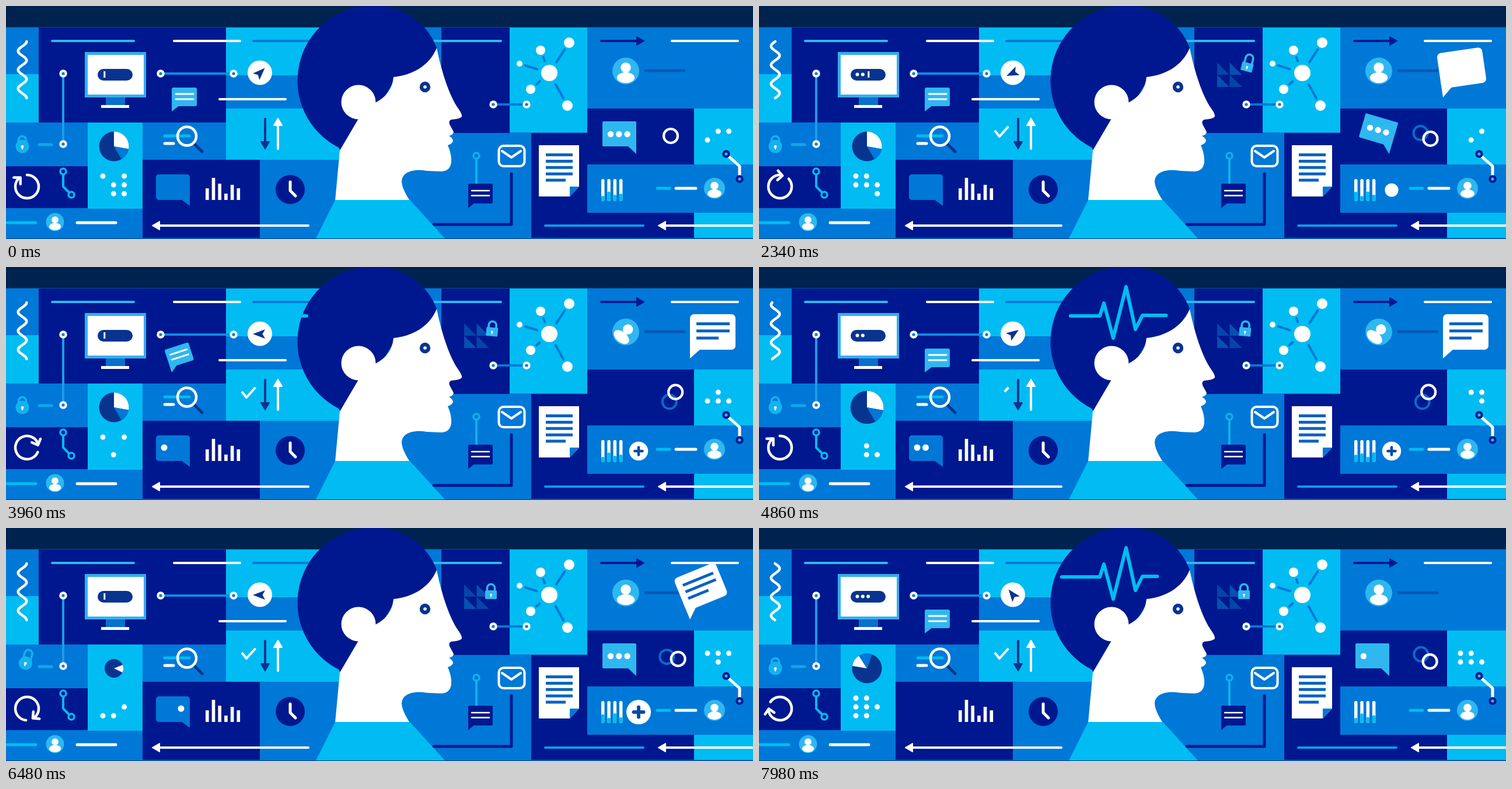
Write an HTML page with a canvas that moves like this. It is 1280x400 px and loops after 8 s.

```html
<!DOCTYPE html>
<html lang="en">
<head>
<meta charset="utf-8">
<title>Connected mind</title>
<style>
html, body { margin: 0; width: 100%; height: 100%; overflow: hidden; background: #00224f; }
canvas { display: block; width: 1280px; height: 400px; }
</style>
</head>
<body>
<canvas id="stage" width="1280" height="400"></canvas>
<script>
const c = document.getElementById('stage').getContext('2d');
const NAVY = '#00188f', BLUE = '#0078d7', CYAN = '#00bcf2', SKY = '#2fb7f0', INK = '#08348f', WHITE = '#fff';
const LOOP = 8, CYCLE = 3.37, TAU = Math.PI * 2, RAD = Math.PI / 180;
let t = 0;

// eased 0 to 1 between two times, and a rise followed by a fall
function ramp(from, to) {
  const f = Math.min(1, Math.max(0, (t - from) / (to - from)));
  return f * f * (3 - 2 * f);
}
const bump = (a, b, d, e) => ramp(a, b) - ramp(d, e);
const random = seed => Math.abs(Math.sin(seed * 127.1 + 3.7) * 43758.5) % 1;

function rect(color, x, y, x2, y2, r = 0) {
  c.fillStyle = color;
  c.beginPath();
  c.roundRect(x, y, x2 - x, y2 - y, r);
  c.fill();
}
function disc(x, y, r, color) {
  if (r <= 0) return;
  c.fillStyle = color;
  c.beginPath();
  c.arc(x, y, r, 0, TAU);
  c.fill();
}
function arc(x, y, r, w, color, from = 0, to = 360) {
  c.strokeStyle = color;
  c.lineWidth = w;
  c.beginPath();
  c.arc(x, y, r, from * RAD, to * RAD);
  c.stroke();
}
function slice(x, y, r, color, from, to) {
  c.fillStyle = color;
  c.beginPath();
  c.moveTo(x, y);
  c.arc(x, y, r, (from - 90) * RAD, (to - 90) * RAD);
  c.fill();
}
function trace(p) {
  c.beginPath();
  for (let i = 0; i < p.length; i += 2) c.lineTo(p[i], p[i + 1]);
}
function poly(color, ...p) {
  c.fillStyle = color;
  trace(p);
  c.fill();
}
function line(color, w, ...p) {
  c.strokeStyle = color;
  c.lineWidth = w;
  trace(p);
  c.stroke();
}
function rule(color, x, x2, y, w = 4) {
  line(color, w, x, y, x2, y);
}
function shape(color, d) {
  c.fillStyle = color;
  c.fill(new Path2D(d));
}
function place(x, y, scale, deg, draw) {
  if (scale <= 0.01) return;
  c.save();
  c.translate(x, y);
  c.scale(scale, scale);
  c.rotate(deg * RAD);
  draw();
  c.restore();
}
function node(x, y, outer = WHITE, inner = BLUE) {
  disc(x, y, 6.7, outer);
  disc(x, y, 2.6, inner);
}
function link(color, x, y, x2, y2) {
  line(color, 4, x, y, x2, y2);
  node(x, y);
  node(x2, y2);
}
function arrow(color, x1, y1, x2, y2) {
  const len = Math.hypot(x2 - x1, y2 - y1);
  place(x1, y1, 1, Math.atan2(y2 - y1, x2 - x1) / RAD, () => {
    rule(color, 0, len - 8, 0);
    poly(color, len - 1, 0, len - 13, -7, len - 13, 7);
    line(color, 2, len - 1, 0, len - 13, -7, len - 13, 7, len - 1, 0);
  });
}
function person(x, y, r, deg = 0) {
  disc(x, y, r, SKY);
  place(x, y, r, deg, () => {
    disc(0, -0.25, 0.38, WHITE);
    c.beginPath();
    c.ellipse(0, 0.5, 0.66, 0.4, 0, 0, TAU);
    c.fill();
  });
}

function tiles() {
  rect('#00224f', 0, 0, 1280, 37);
  rect(BLUE, 0, 36.5, 1280, 400);
  rect(NAVY, 56, 37, 377, 200);
  rect(NAVY, 0, 275, 140, 347);
  rect(NAVY, 234, 264, 435, 398);
  rect(NAVY, 746, 37, 863, 218);
  rect(NAVY, 900, 218, 996, 398);
  rect(NAVY, 996, 176, 1179, 272);
  rect(NAVY, 996, 355, 1179, 398);
  rect(CYAN, 0, 117, 56, 200);
  rect(CYAN, 377, 37, 600, 119);
  rect(CYAN, 377, 176, 600, 264);
  rect(CYAN, 140, 200, 234, 348);
  rect(CYAN, 863, 37, 996, 217);
  rect(CYAN, 1179, 176, 1280, 272);
  rect(CYAN, 1179, 355, 1280, 398);
  rect('#0a3f8f', 0, 399, 1280, 400);
}

function wires() {
  rule(SKY, 79, 219, 60);
  rule(WHITE, 288, 401, 60);
  rule(BLUE, 424, 540, 60);
  rule(SKY, 720, 848, 60);
  rule(WHITE, 1141, 1254, 60);
  rule(WHITE, 366, 479, 160);
  rule('#12a5ec', 57, 78, 238, 5);
  rule(CYAN, 2, 51, 372, 5);
  rule(WHITE, 122, 188, 372, 5);
  rule('#0558b5', 1096, 1162, 111, 5);
  rule(CYAN, 1116, 1137, 313, 5);
  rule(WHITE, 1148, 1182, 313, 5);
  rule('#0a9be8', 924, 1092, 377);

  link('#1e9be8', 98, 116, 98, 237);
  link('#0f8ce4', 265, 116, 390, 116);
  link(BLUE, 835, 169, 892, 169);

  arrow(WHITE, 518, 377, 250, 377);
  arrow(WHITE, 1285, 377, 1117, 377);
  arrow(INK, 444, 194, 444, 246);
  arrow(WHITE, 466, 245, 466, 192);
  arrow(NAVY, 1020, 60, 1094, 60);

  line(CYAN, 4, 98, 290, 98, 310, 108, 320);
  arc(98, 284, 5, 3.5, CYAN);
  arc(112, 324, 5, 3.5, CYAN);
  line(WHITE, 5, 1238, 258, 1257, 275, 1257, 294);
  node(1234, 254, NAVY, SKY);
  node(1257, 297, NAVY, SKY);
  line(NAVY, 5, 733, 375, 866, 375, 866, 288);
}

function spoke(x, y, r) {
  const len = Math.hypot(x - 931, y - 115);
  place(931, 115, 1, Math.atan2(y - 115, x - 931) / RAD, () => rule(BLUE, 22, len - r - 5, 0));
  disc(x, y, r, WHITE);
}

function icons() {
  rect('#36aeee', 135, 79, 240, 157);
  rect(WHITE, 140, 84, 236, 152);
  rect('#0a6fce', 171, 157, 204, 170);
  rect(WHITE, 163, 170, 211, 175);

  rule(WHITE, 272, 287, 236, 5);
  line(INK, 5, 323, 237, 336, 250);
  disc(310, 223.5, 16, BLUE);
  rule(CYAN, 272, 314, 223, 5);
  arc(310, 223.5, 16, 4.5, WHITE);

  [20, 38, 28, 11, 26, 20].forEach((h, i) => rect(WHITE, 342 + i * 10.7, 333 - h, 347.6 + i * 10.7, 333));

  disc(487, 315, 25, NAVY);
  line(WHITE, 5, 487, 302, 487, 317, 496, 326);

  person(84, 371, 15.5);
  person(1214, 313, 18);

  spoke(965, 63, 9);
  spoke(916, 76, 8);
  spoke(880, 99, 5);
  spoke(899, 143, 8);
  spoke(962, 171, 9);
  disc(931, 115, 14, WHITE);

  poly(WHITE, 913, 239, 982, 239, 982, 310, 966, 327, 913, 327);
  poly(BLUE, 966, 310, 982, 310, 966, 327);
  c.lineCap = 'butt';
  for (let i = 0; i < 5; i++) rule('#0b63bf', 925, i < 4 ? 971 : 959, 255.5 + i * 10.9, 5);
  c.lineCap = 'round';

  line(WHITE, 4, 850, 249, 866, 260, 882, 249);
  c.beginPath();
  c.roundRect(844.5, 240, 44, 35, 8);
  c.stroke();

  line('#0fb0ee', 4, 806, 263, 806, 306);
  arc(806, 257, 5, 3.5, '#0fb0ee');
  rect(NAVY, 792, 305, 834, 339, 2);
  poly(NAVY, 792, 336, 792, 347, 804, 337);
  rule(WHITE, 798, 828, 317, 2.5);
  rule(WHITE, 798, 828, 325.5, 2.5);
}

function head() {
  shape(NAVY, 'M573 248L570 243A129 129 0 0 1 628 -1C680 -1 722 28 738 72' +
    'C736 105 700 125 664 130L640 170L604 200Z');
  shape(WHITE, 'M738 72C746 112 760 155 775 176Q782 186 781 190Q778 194 763 195Q758 197 760 203L767 216' +
    'Q767 221 759 223Q766 227 766 232Q764 237 757 239Q764 255 763 268Q761 284 745 284L722 283' +
    'C692 278 678 288 678 302C679 314 688 328 692 334L564 334L572 248L606 190L633 166' +
    'C652 156 662 142 664 122C694 119 725 104 738 72Z');
  disc(604, 165, 29.5, WHITE);
  shape(CYAN, 'M564 333L692 333L752 399L531 399Z');
  disc(718, 139, 9.2, INK);
  disc(718, 139, 2.8, WHITE);
}

function heartbeat(start) {
  const length = 368, reach = (t - start) * 430;
  if (reach <= 0 || reach > 800) return;
  c.setLineDash([length, 2000]);
  c.lineDashOffset = length - reach;
  line(CYAN, 6, 508, 84, 584, 84, 591, 62, 607, 122, 629, 34, 645, 107, 657, 83, 717, 83);
  c.setLineDash([]);
}

function squiggle() {
  const f = Math.min(1, t % CYCLE / 2.5);
  const turns = 4 * (f + 0.07 * Math.sin(Math.PI * f) ** 4);
  const p = [];
  for (let y = 0; y <= 97; y++) p.push(28 + 7.3 * Math.cos((y / 97 * 3 - turns) * TAU), 61 + y);
  line(WHITE, 4.5, ...p);
}

function refresh() {
  const deg = -45 + 49 * ramp(0, 2.5) + 496 * ramp(3.4, 5.9) + 245 * ramp(6.75, 9.25);
  place(36, 310, 1, deg, () => {
    arc(0, 0, 20, 4.5, WHITE, -45, 265);
    line(WHITE, 4.5, -5, -27, 3, -19, -5, -11);
  });
}

function lock(color, lift, keyhole, body) {
  const y = -9 - lift;
  arc(0, y, 6.5, 3.5, color, 180, 360);
  line(color, 3.5, -6.5, y, -6.5, y + 7);
  line(color, 3.5, 6.5, y, 6.5, -4);
  body();
  disc(0, 2.5, keyhole, WHITE);
  rule(WHITE, 0, 0, 3, keyhole);
  line(WHITE, keyhole, 0, 3, 0, 6);
}

function leftLock() {
  const f = bump(5.3, 5.9, 6.75, 7.2);
  place(28 + f * 6, 239 - f * 9, 1, f * 18, () => lock('#16b2ef', f * 6, 2.4, () => disc(0, 2, 11.5, '#16b2ef')));
}

function triangles() {
  const size = ramp(1.75, 2.15);
  place(785, 139, size, 0, () => {
    for (let i = 0; i < 4; i++) {
      const x = i % 2 * 21.5, y = i < 2 ? 0 : -21;
      poly(i % 3 ? '#0446a8' : '#0550b0', x, y - 21, x, y, x + 21, y);
    }
  });
  const loose = 1 - 0.67 * ramp(2.4, 3.4) - 0.33 * ramp(5.1, 5.8);
  place(831 + 6 * loose, 112 - 9.6 * loose, size, 15 * loose, () =>
    lock(SKY, 4 - 4 * ramp(2.4, 3.4), 1.8, () => rect(SKY, -10, -5, 10, 10, 1.5)));
}

function screen() {
  rect(INK, 157, 108, 217, 128, 10);
  const p = t % CYCLE;
  const typed = Math.min(3, Math.max(0, Math.floor((p - 0.6) * 5)));
  const count = p > 2.6 ? 0 : Math.max(0, typed - (p > 1.45));
  for (let i = 0; i < count; i++) disc(168.5 + i * 9.3, 117.5, 3, WHITE);
  const x = 167.3 + count * 9.5;
  if (Math.abs(p - 1.4) > 0.2) rect(WHITE, x, 112, x + 3, 123);
}

function plane() {
  const deg = 45 - 160 * ramp(0, 1.3) + 25 * ramp(2.5, 3.9) + 145 * ramp(4, 4.8)
    - 145 * ramp(5.1, 6.2) + 52 * ramp(6.8, 7.9);
  disc(435, 114.5, 21, WHITE);
  place(435, 115, 1, deg, () => poly(INK, 0, -12, 8, 9, 0, 4.5, -8, 9));
}

function smallChat() {
  const gone = bump(6, 6.35, 6.9, 7.3);
  place(285, 181, 1 - gone, -18 * bump(3.5, 3.96, 3.97, 4.3) - 30 * gone, () => {
    rect(SKY, -1, -41, 42, -9, 3);
    poly(SKY, -1, -14, -1, 0, 12, -10);
    rule(WHITE, 6, 36, -30, 2.8);
    rule(WHITE, 6, 36, -21, 2.8);
  });
}

function check() {
  const ring = ramp(0.4, 0.9) * 360;
  if (!ring) return;
  arc(409, 217.5, 18.3, 2, BLUE, -35, ring - 35);
  const tint = 360 * (ramp(0.6, 1.1) - bump(4.5, 4.86, 5.3, 5.8));
  if (tint) arc(409, 217.5, 18.3, 2, '#2f5db8', -35, tint - 35);

  const again = t > 5.2;
  const from = again ? 0 : ramp(4.5, 5.05);
  const to = again ? ramp(5.3, 5.8) : ramp(0.7, 1.1);
  if (to <= from) return;
  const len = 36;
  c.save();
  c.lineCap = 'butt';
  c.setLineDash([(to - from) * len, 99]);
  c.lineDashOffset = -from * len;
  line(WHITE, 4, 404, 214, 412, 224, 429, 205);
  c.restore();
}

function pie() {
  const size = 1 + 0.11 * bump(4.5, 4.86, 4.9, 5.2) - bump(4.9, 5.4, 6.1, 6.75);
  if (size <= 0) return;
  const again = t > 5.6, age = t - 6.48, r = 25.5 * size;
  const start = again ? 68 + age * 141 : 0;
  const white = start + (again ? 48 : 100);
  const blue = white + (again ? Math.max(0, age * 35) : 50);
  disc(185, 241, r, INK);
  slice(185, 241, r, WHITE, start, white);
  slice(185, 241, r, BLUE, white, blue);
}

function typing(start, gap, hold) {
  for (let i = 0; i < 3; i++) {
    const age = t - start - i * gap;
    if (age >= 0 && age < hold) disc(-44 + i * 14.5, -33, 5.5, WHITE);
  }
}

function blueChat() {
  place(315, 343, 1 - ramp(7, 7.35), 0, () => {
    rect(BLUE, -58, -54, 0, -10, [5, 5, 0, 5]);
    poly(BLUE, -15, -11, 0, -11, 0, 0);
    typing(0.1, 0.25, 0.95);
    typing(3.6, 0.7, 1.9);
  });
}

function skyChat() {
  const gone = bump(2.34, 2.65, 5.3, 5.7);
  place(1080, 253, 1 - gone, 30 * bump(2.05, 2.6, 5.3, 5.7), () => {
    rect(SKY, -58, -55, 0, -12, [2, 2, 0, 2]);
    poly(SKY, -15, -13, 0, -13, 0, 1);
    for (let i = 0; i < (t < 7.3 ? 3 : 1); i++) disc(-44 + i * 14.3, -33, 5.2, WHITE);
  });
}

function whiteChat() {
  const tilt = -25 + 25 * ramp(1.85, 2.65) - 48 * ramp(6.1, 6.9);
  place(1172, 157, bump(1.85, 2.25, 6.45, 6.9), tilt, () => {
    rect(WHITE, 0, -76, 78, -15, 7);
    poly(WHITE, 0, -30, 0, 0, 19, -17);
    c.lineCap = 'butt';
    for (let i = 0; i < 3; i++) {
      const width = (i < 2 ? 57 : 38) * ramp(2.6 + i * 0.15, 2.95 + i * 0.15);
      if (width) rule('#0b63bf', 11, 11 + width, -59.5 + i * 12.3, 5);
    }
  });
}

function rings() {
  const apart = ramp(1.5, 2.1);
  const a = (30 - 88 * ramp(2.5, 3.8) + 69 * ramp(5.1, 6.4) + 28 * ramp(6.6, 7.9)) * RAD;
  const x = 1139 + 3 * apart, dx = Math.cos(a) * 9.8 * apart, dy = Math.sin(a) * 9.8 * apart;
  if (apart) arc(x - dx, 223 - dy, 12, 4, '#0a6cca');
  arc(x + dx, 223 + dy, 12, 4.2, WHITE);
}

function gauges() {
  for (let i = 0; i < 4; i++) {
    const x = 1020 + i * 10.3;
    const level = 13 - 4 * Math.cos(i * 2.6 + t * 1.6);
    rect(WHITE, x, 297, x + 5.5, 335, 2.5);
    rect(CYAN, x, 335 - level, x + 5.5, 335, 2.5);
  }
}

function plus() {
  const size = bump(2.05, 2.5, 6.5, 6.85) + 0.3 * bump(6.2, 6.48, 6.5, 6.85);
  disc(1084, 316, 16.2 * size, WHITE);
  place(1084, 316, size * ramp(2.4, 2.85), 0, () => {
    rule('#0a4aa6', -6.5, 6.5, 0, 4.6);
    line('#0a4aa6', 4.6, 0, -6.5, 0, 6.5);
  });
}

// every dot of a grid flips at random on its own beat
function blink(seed, x, y, rows) {
  for (let k = 0; k < rows * 3; k++) {
    const beat = Math.floor(t * 0.9 + random(seed + k));
    if (random(seed + k * 7 + beat * 31) > 0.45) disc(x + k % 3 * 18.3, y + Math.floor(k / 3) * 15.1, 4.5, WHITE);
  }
}

function draw() {
  t = performance.now() / 1000 % LOOP;
  c.lineCap = c.lineJoin = 'round';
  tiles();
  wires();
  icons();
  head();
  for (const start of [0.3, 3.945, 7.1]) heartbeat(start);
  squiggle();
  refresh();
  leftLock();
  triangles();
  screen();
  plane();
  smallChat();
  check();
  pie();
  blueChat();
  skyChat();
  rings();
  gauges();
  plus();
  person(1062, 111.5, 23, 40 * bump(3.4, 3.9, 5.1, 5.6));
  whiteChat();
  blink(11, 166, 292, 3);
  blink(53, 1202, 215, 2);
  requestAnimationFrame(draw);
}
draw();
</script>
</body>
</html>
```
